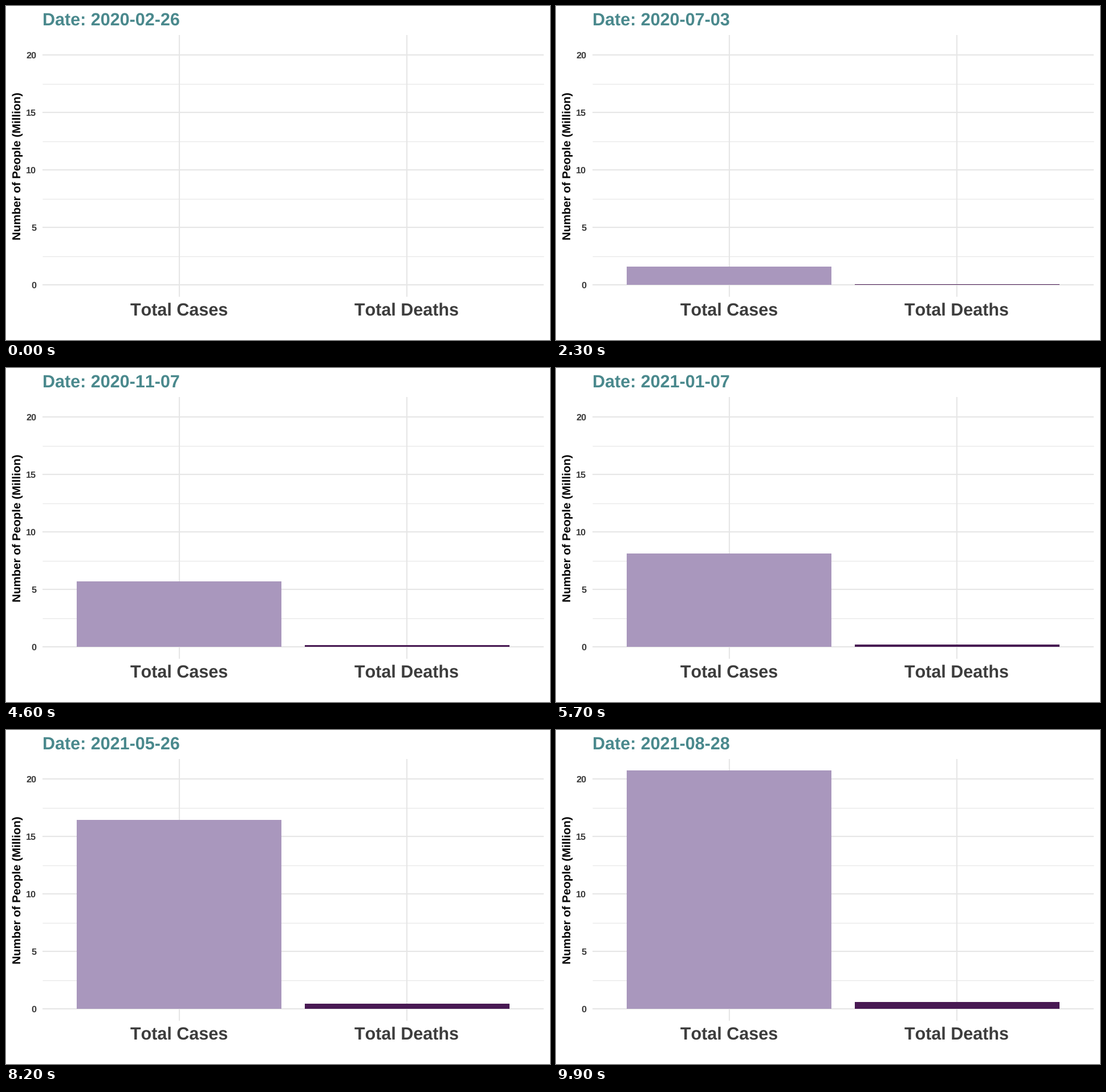
Animation of 954x587 px, one loop 10000 ms. Source, as a matplotlib script:

```python
import numpy as np
import matplotlib.pyplot as plt
from matplotlib.animation import FuncAnimation
from matplotlib.patches import Rectangle

W, H, DPI = 954, 587, 64
FRAMES, INTERVAL = 100, 100
LEFT, RIGHT, TOP, BOTTOM = 64, 943, 50.5, 511
ZERO, UNIT = 490, 20.2              # baseline and pixels per million
GRID, GREY = "#E6E6E6", "#3D3D3D"

START, END = np.datetime64("2020-02-26"), np.datetime64("2021-08-28")
SPAN = int((END - START).astype(int))
STEP = SPAN / (FRAMES - 1)

plt.rcParams.update({
    "font.family": "Liberation Sans",
    "font.weight": "bold",
    "text.hinting": "none",
    "text.kerning_factor": 6,
})

fig = plt.figure(figsize=(W / DPI, H / DPI), dpi=DPI, facecolor="white")
ax = fig.add_axes([0, 0, 1, 1])
ax.set_xlim(0, W)
ax.set_ylim(H, 0)
ax.axis("off")


def pt(px):
    return px * 72 / DPI


def running_total(*turns):
    """Sum a daily rate (thousands) that runs straight between its turns."""
    days, rates = zip(*turns)
    rate = np.interp(np.arange(SPAN + 1), days, rates)
    return np.cumsum(rate) / 1000


def line(xs, ys, width):
    ax.plot(xs, ys, color=GRID, lw=pt(width), solid_capstyle="butt", zorder=1)


def label(x, y, text, size, color, ha="center", **kw):
    return ax.text(x, y, text, fontsize=pt(size), color=color, ha=ha,
                   va="baseline", zorder=3, **kw)


def bar(x0, x1, color):
    patch = Rectangle((x0, ZERO), x1 - x0, 0, fc=color, ec="none", lw=0,
                      snap=False, zorder=2)
    return ax.add_patch(patch)


for value in np.arange(2.5, 20, 5):
    y = ZERO - value * UNIT
    line((LEFT, RIGHT), (y, y), 1.1)

for value in range(0, 21, 5):
    y = ZERO - value * UNIT
    line((LEFT, RIGHT), (y, y), 2.1)
    label(53.5, y + 6.2, str(value), 16.3, GREY, ha="right")

for x, name in ((303.3, "Total Cases"), (702.8, "Total Deaths")):
    line((x + 0.3, x + 0.3), (TOP, BOTTOM), 2.1)
    label(x, 544, name, 30.5, GREY)

label(26, 281, "Number of People (Million)", 20.45, "black",
      rotation=90, rotation_mode="anchor")
title = label(63.5, 34, "", 30.5, "#4A898D", ha="left")

# Each turn is (day, new people per day in thousands)
cases = running_total((45, 0), (155, 47), (235, 20), (250, 18), (285, 43),
                      (355, 50), (395, 75), (425, 61), (485, 68), (505, 40),
                      (SPAN, 22))
deaths = running_total((35, 0), (85, 0.95), (165, 1), (235, 0.45), (280, 0.5),
                       (320, 1), (360, 1.05), (405, 2.9), (440, 1.9),
                       (480, 1.9), (SPAN, 0.6))

bars = [(bar(124, 483, "#A997BD"), cases), (bar(524, 883, "#481953"), deaths)]


def update(i):
    title.set_text(f"Date: {START + int(round(i * STEP))}")
    # bars show the latest day that falls within the current step
    day = min(int((i + 0.5) * STEP), SPAN)
    for patch, total in bars:
        patch.set_height(-round(total[day] * UNIT))
    return [title] + [patch for patch, _ in bars]


anim = FuncAnimation(fig, update, frames=FRAMES, interval=INTERVAL,
                     repeat=True, repeat_delay=0, blit=False)
plt.show()
```
